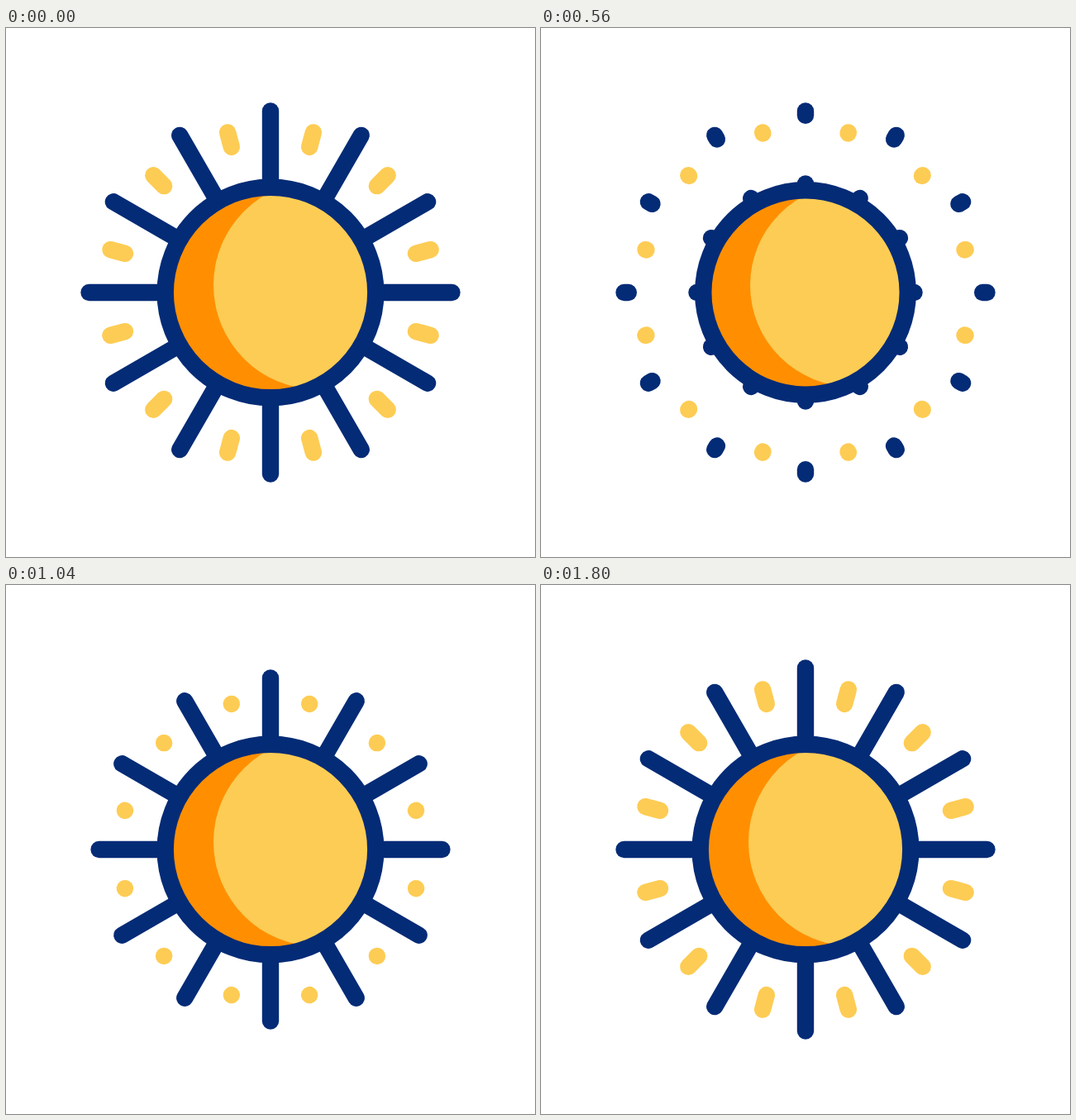
These frames come from a looping animation (640x640 px, 2.4 s). An HTML page without scripts:

```html
<!DOCTYPE html>
<html lang="en">
<head>
<meta charset="utf-8">
<title>Shining sun</title>
<style>
  html, body { margin: 0; width: 100%; height: 100%; overflow: hidden; background: #fff; }
  svg { display: block; width: 100%; height: 100%; }
  line { stroke-width: 20.4; stroke-linecap: round; }
  .ray { stroke: #042b76; }
  .spark { stroke: #fdcc54; }
  .ring { fill: none; stroke: #042b76; stroke-width: 20.4; }
</style>
</head>
<body>
<svg viewBox="-320 -320 640 640">
  <defs>
    <clipPath id="disc"><circle r="122"/></clipPath>

    <!-- each beam: one line leaves outwards, a second one grows back -->
    <g id="ray" class="ray">
      <line y1="-131" y2="-219.5">
        <animate attributeName="y1" dur="2.4s" repeatCount="indefinite" calcMode="spline"
          values="-131;-219.5;-219.5" keyTimes="0;.33333;1" keySplines=".35 0 .2 1;0 0 1 1"/>
        <animate attributeName="visibility" dur="2.4s" repeatCount="indefinite" calcMode="discrete"
          values="visible;hidden" keyTimes="0;.33333"/>
      </line>
      <line y1="-131" y2="-131" visibility="hidden">
        <animate attributeName="y2" dur="2.4s" repeatCount="indefinite" calcMode="spline"
          values="-131;-131;-219.5;-219.5" keyTimes="0;.21667;.59167;1"
          keySplines="0 0 1 1;.35 0 .2 1;0 0 1 1"/>
        <animate attributeName="visibility" dur="2.4s" repeatCount="indefinite" calcMode="discrete"
          values="hidden;visible" keyTimes="0;.21667"/>
      </line>
    </g>

    <g id="spark" class="spark">
      <line y1="-182.2" y2="-200.4">
        <animate attributeName="y1" dur="2.4s" repeatCount="indefinite" calcMode="spline"
          values="-182.2;-200.4;-200.4" keyTimes="0;.33333;1" keySplines=".35 0 .2 1;0 0 1 1"/>
        <animate attributeName="visibility" dur="2.4s" repeatCount="indefinite" calcMode="discrete"
          values="visible;hidden" keyTimes="0;.33333"/>
      </line>
      <line y1="-182.2" y2="-182.2" visibility="hidden">
        <animate attributeName="y2" dur="2.4s" repeatCount="indefinite" calcMode="spline"
          values="-182.2;-182.2;-200.4;-200.4" keyTimes="0;.41667;.75;1"
          keySplines="0 0 1 1;.35 0 .2 1;0 0 1 1"/>
        <animate attributeName="visibility" dur="2.4s" repeatCount="indefinite" calcMode="discrete"
          values="hidden;visible" keyTimes="0;.41667"/>
      </line>
    </g>

    <g id="quarter">
      <use href="#ray"/>
      <use href="#spark" transform="rotate(15)"/>
      <use href="#ray" transform="rotate(30)"/>
      <use href="#spark" transform="rotate(45)"/>
      <use href="#ray" transform="rotate(60)"/>
      <use href="#spark" transform="rotate(75)"/>
    </g>
  </defs>

  <use href="#quarter"/>
  <use href="#quarter" transform="rotate(90)"/>
  <use href="#quarter" transform="rotate(180)"/>
  <use href="#quarter" transform="rotate(270)"/>

  <g>
    <animateTransform attributeName="transform" type="scale" dur="2.4s" repeatCount="indefinite"
      calcMode="spline" values="1;.813;1;1" keyTimes="0;.14167;.30833;1"
      keySplines=".35 0 .2 1;.35 0 .2 1;0 0 1 1"/>
    <g clip-path="url(#disc)">
      <circle r="122" fill="#ff8f00"/>
      <circle cx="57.2" cy="-9" r="126.2" fill="#fdcc54"/>
    </g>
  </g>
  <circle class="ring" r="127.3">
    <animate attributeName="r" dur="2.4s" repeatCount="indefinite" calcMode="spline"
      values="127.3;105;127.3;127.3" keyTimes="0;.14167;.30833;1"
      keySplines=".35 0 .2 1;.35 0 .2 1;0 0 1 1"/>
  </circle>
</svg>
</body>
</html>
```
